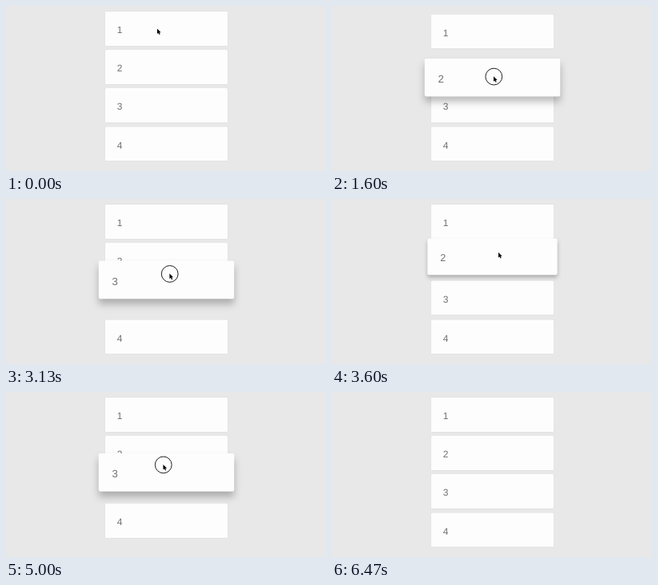
These frames come from a looping animation (400x207 px, 7740 ms). An HTML page:

```html
<!DOCTYPE html>
<html lang="en">
<head>
<meta charset="utf-8">
<title>Draggable list</title>
<style>
  html, body { margin: 0; width: 100%; height: 100%; overflow: hidden; background: #e8e8e8; }
  svg { display: block; width: 100%; height: 100%; }
  text { font: 12px "Liberation Sans", Arial, sans-serif; fill: #707070; text-rendering: geometricPrecision; }
</style>
</head>
<body>
<svg id="stage" viewBox="0 0 400 207">
  <g id="cards"></g>
  <circle id="ring" r="10.4" fill="none" stroke="#111" stroke-width=".95"/>
  <path id="pointer" d="M0 0V6.6L1.5 5.2L2.6 7.6L3.7 7.1L2.7 4.8H4.7Z" fill="#000"
        stroke="#fff" stroke-width=".6" stroke-linejoin="round" paint-order="stroke"/>
</svg>
<script>
const LOOP = 7740;
const HIDE_AT = 6465;
const LAG = 20;          // the dragged card trails the pointer slightly
const CARD = { x: 200.5, w: 154, h: 43.3, pitch: 48.1, first: 28.5 };
const NS = "http://www.w3.org/2000/svg";

const smooth = u => u * u * (3 - 2 * u);
const easeOut = u => Math.sin(u * Math.PI / 2);
const clamp = (v, lo, hi) => Math.min(hi, Math.max(lo, v));
const el = id => document.getElementById(id);
const slotY = i => CARD.first + i * CARD.pitch;

// Pointer: each move runs from where the last one ended
const origin = { x: 189, y: 28.5 };
const moves = [
  { start: 60, end: 270, x: 202, y: 28.5, ease: smooth },
  { start: 1012, end: 1560, x: 202, y: 90, ease: smooth },
  { start: 1570, end: 1710, x: 202, y: 75.5, ease: smooth },
  { start: 2110, end: 2578, x: 200.5, y: 122.6, ease: smooth },
  { start: 3040, end: 3300, x: 208, y: 67, ease: easeOut },
  { start: 3830, end: 4200, x: 181.5, y: 166.8, ease: smooth },
  { start: 4670, end: 5285, x: 201.5, y: 65.5, ease: easeOut },
  { start: 6290, end: 6420, x: 235, y: 26.5, ease: smooth }
];

// from: slot picked up, dir: travel, grip: card centre below the pointer
const drags = [
  { press: 500, drop: 1730, from: 0, dir: 1, grip: 0 },
  { press: 2585, drop: 3482, from: 2, dir: -1, grip: 1.9 },
  { press: 4260, drop: 5540, from: 3, dir: -1, grip: 6.3 }
];

function pointerAt(t) {
  let { x, y } = origin;
  for (const m of moves) {
    const u = m.ease(clamp((t - m.start) / (m.end - m.start), 0, 1));
    x += (m.x - x) * u;
    y += (m.y - y) * u;
  }
  return { x, y };
}

// Critically damped spring: share of the distance still left
function left(ms) {
  const k = 0.013 * Math.max(0, ms);
  return (1 + k) * Math.exp(-k);
}

const heldY = (drag, t) => pointerAt(Math.min(t, drag.drop) - LAG).y + drag.grip;

// Times at which the held card passes the middle between two slots
for (const drag of drags) {
  drag.swaps = [];
  for (let t = drag.press; t < drag.drop; t++) {
    const edge = slotY(drag.from + drag.dir * (drag.swaps.length + 0.5));
    if ((heldY(drag, t) - edge) * drag.dir > 0) drag.swaps.push(t);
  }
}

function make(tag, attrs) {
  const node = document.createElementNS(NS, tag);
  for (const k in attrs) node.setAttribute(k, attrs[k]);
  return node;
}

function makeCard() {
  const { w, h } = CARD;
  const g = make("g");
  const rect = make("rect", { x: -w / 2, y: -h / 2, width: w, height: h, rx: 2, fill: "#fdfdfd" });
  const text = make("text", { x: 15.2 - w / 2, y: 5.7 });
  g.append(rect, text);
  el("cards").append(g);
  return { g, rect, text };
}

function place(card, slot, y, lift) {
  const drop = 0.9 + 5.6 * lift, blur = 0.7 + 3.8 * lift;
  card.g.setAttribute("transform", `translate(${CARD.x} ${y}) scale(${1 + 0.1 * lift})`);
  card.rect.style.filter = `drop-shadow(0 ${drop}px ${blur}px rgba(0,0,0,.26))`;
  card.text.textContent = slot + 1;
}

const cards = [0, 1, 2, 3].map(makeCard);

function draw(t) {
  let drag = drags.filter(d => d.press <= t).pop();
  let now = t;
  if (!drag) {
    drag = drags[drags.length - 1];
    now += LOOP;
  }
  const held = now < drag.drop;
  const passed = drag.swaps.filter(s => s <= now).length;
  const slot = drag.from + drag.dir * passed;

  const others = [0, 1, 2, 3].filter(i => i !== slot);
  others.forEach((s, i) => {
    const n = (s - drag.from) * drag.dir;
    const moved = n >= 0 && n < passed;
    const shift = moved ? drag.dir * CARD.pitch * left(now - drag.swaps[n]) : 0;
    place(cards[i], s, slotY(s) + shift, 0);
  });

  const lift = 1 - left(Math.min(now, drag.drop) - drag.press);
  const rest = left(now - drag.drop);
  const home = slotY(slot);
  place(cards[3], slot, home + (heldY(drag, now) - home) * rest, lift * rest);

  const { x, y } = pointerAt(t);
  el("pointer").setAttribute("transform", `translate(${x} ${y})`);
  el("pointer").setAttribute("visibility", t < HIDE_AT ? "visible" : "hidden");
  el("ring").setAttribute("transform", `translate(${x + 0.3} ${y + 0.4})`);
  el("ring").setAttribute("visibility", held ? "visible" : "hidden");
}

const start = performance.now();
function tick() {
  draw((performance.now() - start) % LOOP);
  requestAnimationFrame(tick);
}
tick();
</script>
</body>
</html>
```
